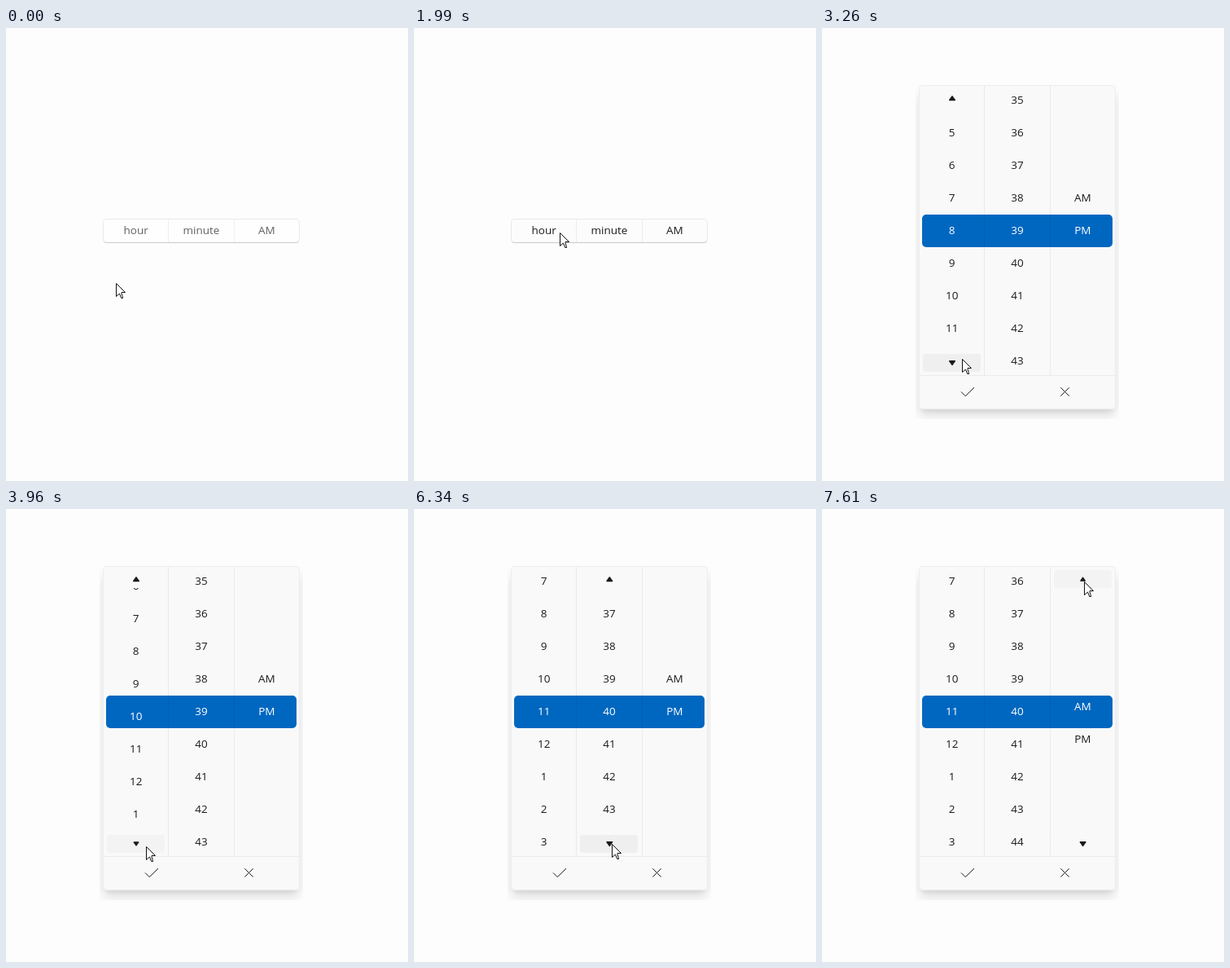
Animation, 494 px wide and 556 px high, one loop 8 s. Source, as an HTML page:

```html
<!DOCTYPE html>
<html lang="en">
<head>
<meta charset="utf-8">
<title>Time picker</title>
<style>
html, body { margin: 0; width: 100%; height: 100%; overflow: hidden; background: #fdfdfd; }
svg { display: block; }
text { font: 13.5px "Open Sans", "Noto Sans", sans-serif; text-anchor: middle; }
.rule { stroke: #000; stroke-opacity: .06; fill: none; }
.icon { stroke: #1b1b1b; fill: none; }
.arrow { fill: #1b1b1b; stroke: #1b1b1b; stroke-width: 1.6; stroke-linejoin: round; }
</style>
</head>
<body>
<svg width="494" height="556" viewBox="0 0 494 556">
  <defs>
    <clipPath id="rows"><rect x="120" y="71" width="240" height="355"/></clipPath>
    <clipPath id="halo"><rect x="115" y="70" width="250" height="410"/></clipPath>
    <filter id="soft" x="-20%" y="-20%" width="140%" height="140%"><feGaussianBlur stdDeviation="7"/></filter>
    <filter id="tight" x="-20%" y="-20%" width="140%" height="140%"><feGaussianBlur stdDeviation="1.5"/></filter>
  </defs>
  <g id="view"></g>
  <path id="cursor" d="M.5 .5V16.5L4.5 13L6.7 18.5H8.6L6.9 12.2L7 11.5H11.5Z" fill="#fff" stroke="#111"/>
</svg>
<script>
const LOOP = 8000, OPEN_AT = 2380, TICK = 130, ROW = 40, MID = 248, INK = '#1b1b1b';
const view = document.getElementById('view');
const cursor = document.getElementById('cursor');

const out = u => Math.sin(u * Math.PI / 2);
const smooth = u => u * u * (3 - 2 * u);
const move = (start, end, x, y, easeY = out) => ({ start, end, x, y, easeY });

const moves = [
  move(1030, 1990, 179, 251, smooth),
  move(2840, 3380, 172, 414),
  move(4900, 5410, 235, 413),
  move(6340, 6340, 243, 411),
  move(6460, 6820, 334, 223, smooth),
  move(6970, 7350, 322, 89)
];

const columns = [
  { first: 8, clicks: [3680, 3960, 4240], step: 1, label: n => (n + 11) % 12 + 1 },
  { first: 39, clicks: [5560], step: 1, label: n => n % 60 },
  { first: 1, clicks: [7490], step: -1, label: n => ['AM', 'PM'][n] || '' }
];
const centre = i => 159.7 + 80.3 * i;

// The pointer advances in even ticks from each move's start to its end.
function pointer(t) {
  let x = 135, y = 313;
  for (const m of moves) {
    if (t < m.start) break;
    const ticks = Math.round((m.end - m.start) / TICK);
    const done = ticks ? Math.floor((t - m.start) / (m.end - m.start) * ticks + 1e-6) : 0;
    const u = Math.min((done + 1) / (ticks + 1), 1);
    x += (m.x - x) * out(u);
    y += (m.y - y) * m.easeY(u);
  }
  return [Math.round(x), Math.round(y)];
}

// Each click scrolls most of a row while held and settles on release.
const scroll = (col, t) => col.clicks.reduce(
  (v, c) => v + col.step * (t < c ? 0 : t < c + TICK ? .85 : 1), col.first);

const text = (x, y, s, fill = INK) => `<text x="${x}" y="${y + 5}" fill="${fill}">${s}</text>`;
const box = (x, y, w, h, attrs) => `<rect x="${x}" y="${y}" width="${w}" height="${h}" ${attrs}/>`;

function field(hover) {
  return box(119.5, 234.5, 241, 29, `rx="4" fill="${hover ? '#fcfcfc' : '#fefefe'}" stroke="#e9e9e9"`) +
    '<path d="M120.5 262Q121.5 263.5 123.5 263.5H356.5Q358.5 263.5 359.5 262" fill="none" stroke="#cbcbcb"/>' +
    '<path class="rule" d="M199.5 235V263M280.5 235V263"/>' +
    ['hour', 'minute', 'AM'].map((s, i) => text(centre(i), MID, s, hover ? INK : '#606060')).join('');
}

function button(i, up, mx, my, held) {
  const left = Math.round(centre(i) - 35.7), top = up ? 75 : 400;
  const over = mx >= left && mx < left + 72 && my >= top && my <= top + 22;
  const fill = !over ? '#f9f9f9' : held ? '#f3f3f3' : '#efefef';
  const size = over && held ? .85 : 1;
  return box(left, top, 71, 22, `rx="4" fill="${fill}"`) +
    `<path class="arrow" d="M-3.2 2.3L0 -2.3L3.2 2.3Z" transform="translate(${centre(i) + .3} ${up ? 86.2 : 411}) scale(${size} ${up ? size : -size})"/>`;
}

function column(col, i, t, mx, my, active) {
  const value = scroll(col, t), base = Math.round(value), held = value !== base;
  let rows = '';
  for (let n = base - 5; n <= base + 5; n++) {
    const y = MID + (n - value) * ROW;
    rows += text(centre(i), y, col.label(n), Math.abs(y - MID) < ROW / 2 ? '#fff' : INK);
  }
  return active ? rows + button(i, true, mx, my, held) + button(i, false, mx, my, held) : rows;
}

function popup(t, mx, my) {
  const active = mx < 200 ? 0 : mx < 281 ? 1 : 2;
  return '<g clip-path="url(#halo)">' +
    box(119, 80, 242, 396, 'rx="8" fill-opacity=".12" filter="url(#soft)"') +
    box(121, 76, 238, 396, 'rx="6" fill-opacity=".04" filter="url(#tight)"') +
    box(119.5, 70.5, 241, 397, 'rx="4" fill="#f9f9f9" stroke="#eee"') + '</g>' +
    box(123, 229, 234, 40, 'rx="5" fill="#0067c0"') +
    '<path class="rule" d="M199.5 71V426M280.5 71V426M120 426.5H360"/>' +
    `<g clip-path="url(#rows)">${columns.map((c, i) => column(c, i, t, mx, my, i === active)).join('')}</g>` +
    '<path class="icon" d="M171 446.5L176.3 451.8L187 441.2M293.3 441.3L303.7 451.7M303.7 441.3L293.3 451.7"/>';
}

let shown = '';
function frame(now) {
  const t = now % LOOP;
  const [mx, my] = pointer(t);
  const markup = t >= OPEN_AT ? popup(t, mx, my) : field(my < 264);
  if (markup !== shown) view.innerHTML = shown = markup;
  cursor.setAttribute('transform', `translate(${mx} ${my})`);
  requestAnimationFrame(frame);
}
frame(performance.now());
</script>
</body>
</html>
```
